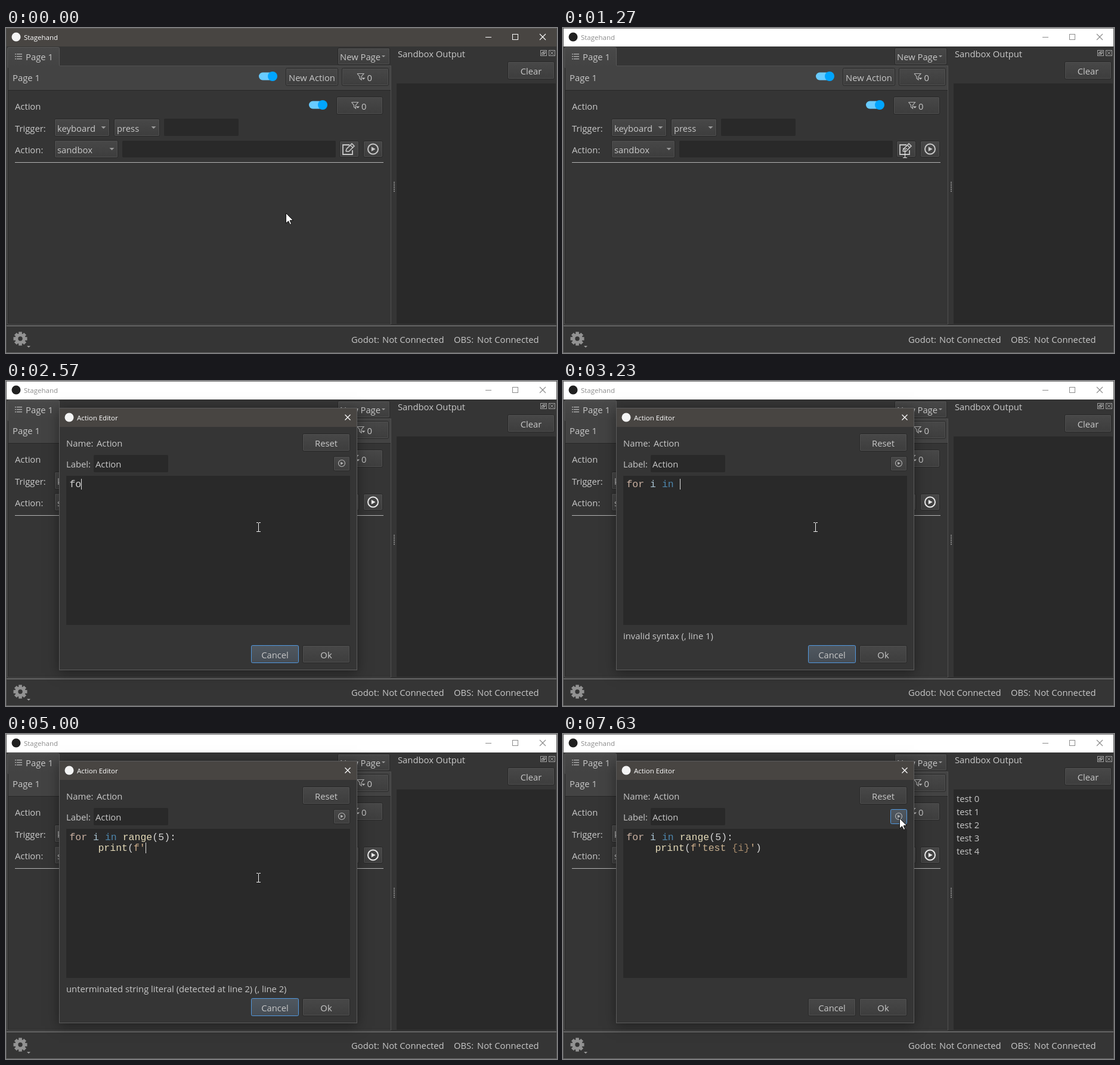
Recreate the animation shown at these times as an HTML page with a canvas. Size 924 by 545 pixels, loop 9.73 s.

```html
<!DOCTYPE html>
<html lang="en">
<head>
<meta charset="utf-8">
<title>Action editor</title>
<style>
html, body { margin: 0; width: 100%; height: 100%; overflow: hidden; background: #353535; }
canvas { display: block; }
</style>
</head>
<body>
<canvas id="stage" width="924" height="545"></canvas>
<script>
const LOOP = 9730, W = 924, H = 545;
const UI = '14.8px "Open Sans", "Noto Sans", sans-serif';
const TITLE = '11.5px "Open Sans", "Noto Sans", sans-serif';
const CODE = '16.55px "Liberation Mono", monospace';
const INK = '#c8c8c8', BASE = '#353535', FIELD = '#292929';

const screen = document.getElementById('stage').getContext('2d');
const layer = Object.assign(document.createElement('canvas'), { width: W, height: H });
const layerCtx = layer.getContext('2d');
let g = screen;

// Timing
const SOURCE = "for i in range(5):\n\tprint(f'test {i}')\n";
const KEY_TIMES = [[1, 2470], [9, 3230], [10, 3330], [11, 3430], [12, 3500], [18, 4000], [19, 4140],
  [22, 4470], [28, 5000], [29, 5100], [33, 5470], [34, 5530], [38, 5850], [39, 5950]];
const POINTER = [[0, 469, 310], [170, 490, 302], [400, 490, 302], [1130, 573, 210], [1370, 573, 210],
  [1500, 466, 239], [1600, 423, 245], [3500, 423, 245], [3700, 423, 241], [6770, 423, 241], [7430, 564, 141]];
const INACTIVE_AT = 1230, OPEN_AT = 1370, PRESS_AT = 7530, OUTPUT_AT = 7630;
const MESSAGES = [[38, ''], [37, "'(' was never closed (, line 2)"],
  [28, 'unterminated string literal (detected at line 2) (, line 2)'],
  [26, "'(' was never closed (, line 2)"], [21, ''],
  [18, "expected an indented block after 'for' statement on line 1 (, line 1)"],
  [17, "expected ':' (, line 1)"], [15, "'(' was never closed (, line 1)"],
  [10, "expected ':' (, line 1)"], [3, 'invalid syntax (, line 1)'], [0, '']];

const clamp = v => Math.max(0, Math.min(1, v));
const smooth = v => v * v * (3 - 2 * v);

function keyTime(n) {
  const i = KEY_TIMES.findIndex(k => k[0] >= n);
  const [n1, t1] = KEY_TIMES[i];
  if (n1 === n) return t1;
  const [n0, t0] = KEY_TIMES[i - 1];
  return t0 + (t1 - t0) * (n - n0) / (n1 - n0);
}

function typedCount(t) {
  let n = 0;
  while (n < SOURCE.length && keyTime(n + 1) <= t + 0.5) n++;
  return n;
}

function pointerAt(t) {
  const i = POINTER.findIndex(p => p[0] > t);
  if (i < 0) return POINTER[POINTER.length - 1].slice(1);
  const [t0, x0, y0] = POINTER[i - 1], [t1, x1, y1] = POINTER[i];
  const k = smooth((t - t0) / (t1 - t0));
  return [Math.round(x0 + (x1 - x0) * k), Math.round(y0 + (y1 - y0) * k)];
}

// Drawing helpers
function rect(x, y, w, h, fill) {
  g.fillStyle = fill;
  g.fillRect(x, y, w, h);
}

function round(x, y, w, h, r, fill, stroke) {
  g.beginPath();
  g.roundRect(x, y, w, h, r);
  if (fill) { g.fillStyle = fill; g.fill(); }
  if (stroke) { g.strokeStyle = stroke; g.lineWidth = 1; g.stroke(); }
}

function disc(x, y, r, fill) {
  g.beginPath();
  g.arc(x, y, r, 0, 7);
  g.fillStyle = fill;
  g.fill();
}

function ring(x, y, r, width, color) {
  g.beginPath();
  g.arc(x, y, r, 0, 7);
  g.lineWidth = width;
  g.strokeStyle = color;
  g.stroke();
}

function line(points, color, width = 1, fill) {
  g.beginPath();
  points.forEach(([x, y]) => g.lineTo(x, y));
  if (fill) { g.closePath(); g.fillStyle = fill; g.fill(); }
  if (color) { g.strokeStyle = color; g.lineWidth = width; g.stroke(); }
}

function text(str, x, midY, color = INK, font = UI, align = 'left') {
  g.font = font;
  g.fillStyle = color;
  g.textAlign = align;
  g.fillText(str, x, midY + (font === TITLE ? 4 : 5));
}

function shade(y, h, top, bottom) {
  const s = g.createLinearGradient(0, y, 0, y + h);
  s.addColorStop(0, top);
  s.addColorStop(1, bottom);
  return s;
}

function button(x, y, w, h, label, focused, labelX = x + w / 2) {
  const fill = focused ? shade(y, h, '#505860', '#454c54') : shade(y, h, '#484848', '#3d3d3d');
  round(x + 0.5, y + 0.5, w - 1, h - 1, 2, fill, focused ? '#5299e0' : '#272727');
  if (!focused) round(x + 1.5, y + 1.5, w - 3, h - 3, 1, null, '#505050');
  if (label) text(label, labelX, Math.floor(y + h / 2) + 2, INK, UI, 'center');
}

function down(x, y, r, color = '#9a9a9a') {
  line([[x - r, y], [x + r, y], [x, y + r]], null, 1, color);
}

function combo(x, y, w, label) {
  button(x, y, w, 30);
  text(label, x + 5, y + 17);
  down(x + w - 10.5, y + 13, 4);
}

function toggle(x, y) {
  round(x, y - 6.5, 24, 13, 6.5, '#68cbff');
  disc(x + 23, y, 8, '#00a5ff');
}

function filterButton(x, y, w) {
  button(x, y, w, 30);
  const cx = x + w / 2 - 7, cy = y + 15;
  line([[cx - 6.5, cy - 5.5], [cx + 4.5, cy - 5.5], [cx + 0.5, cy - 0.5], [cx + 0.5, cy + 5],
    [cx - 2.5, cy + 2.5], [cx - 2.5, cy - 0.5], [cx - 6.5, cy - 5.5]], '#b4b4b4', 1.2);
  down(cx + 4, cy + 1.5, 3, INK);
  text('0', x + w / 2 + 3, cy + 2);
}

function playIcon(x, y, r, width, color) {
  ring(x, y, r, width, color);
  const s = r * 0.45;
  line([[x - s * 0.7, y - s], [x + s * 1.1, y], [x - s * 0.7, y + s]], null, 1, color);
}

function cross(x, y, r, color, width = 1) {
  line([[x - r, y - r], [x + r, y + r]], color, width);
  line([[x - r, y + r], [x + r, y - r]], color, width);
}

function editIcon(x, y) {
  line([[x + 2, y - 7], [x - 9, y - 7], [x - 9, y + 9], [x + 7, y + 9], [x + 7, y + 2]], INK, 1.8);
  line([[x - 4, y + 4], [x - 3, y], [x + 6, y - 9], [x + 10, y - 5], [x + 1, y + 4], [x - 4, y + 4]], INK, 1.6);
  line([[x + 3.5, y - 6.5], [x + 7.5, y - 2.5]], INK, 1.4);
}

function gear(x, y) {
  const color = '#929292';
  g.save();
  g.translate(x, y);
  for (let i = 0; i < 8; i++) {
    rect(-2.8, -11.5, 5.6, 6, color);
    g.rotate(Math.PI / 4);
  }
  g.restore();
  ring(x, y, 6.2, 5, color);
}

// Parts of the picture
function titleBar(active) {
  rect(0, 0, W, 31, active ? '#484542' : '#ffffff');
  rect(0, 0, W, 1, active ? '#5a5856' : '#707070');
  const ink = active ? '#ffffff' : '#8c8c8c';
  disc(17, 15, 7.5, active ? '#f4f4f4' : '#202020');
  text('Stagehand', 30, 16, ink, TITLE);
  rect(804, 15, 10, 1, ink);
  g.strokeStyle = ink;
  g.lineWidth = 1;
  g.strokeRect(849.5, 10.5, 9, 9);
  cross(900, 15, 5, ink, 1.1);
}

function mainWindow(t) {
  rect(0, 0, W, H, BASE);
  titleBar(t < INACTIVE_AT);

  // Page tab and its header
  rect(3, 63, 643, 434, '#272727');
  rect(4, 64, 641, 40, '#434343');
  rect(4, 105, 641, 390, BASE);
  g.strokeStyle = '#515151';
  g.lineWidth = 1;
  g.strokeRect(2.5, 63.5, 643, 433);
  round(2.5, 32.5, 87, 33, [2, 2, 0, 0], shade(32, 32, '#494949', '#434343'), '#595959');
  rect(3, 63, 87, 4, '#434343');
  for (let i = 0; i < 3; i++) {
    rect(15, 43 + i * 4, 2, 1.5, '#a8a8a8');
    rect(18, 43 + i * 4, 9, 1.5, '#a8a8a8');
  }
  text('Page 1', 33, 49);
  button(556, 33, 88, 29, 'New Page', false, 594);
  down(633, 46, 3);
  text('Page 1', 11, 84);
  toggle(424, 81);
  button(469, 67, 88, 30, 'New Action');
  filterButton(563, 67, 79);

  // Action row
  text('Action', 15, 132);
  toggle(508, 129);
  filterButton(554, 115, 78);
  text('Trigger:', 15, 169);
  combo(81, 152, 93, 'keyboard');
  combo(181, 152, 77, 'press');
  round(265, 152, 125, 29, 2, FIELD);
  text('Action:', 15, 205);
  combo(81, 188, 107, 'sandbox');
  round(195, 189, 358, 28, 2, FIELD);
  button(559, 189, 33, 28);
  editIcon(574, 203);
  button(599, 189, 33, 28);
  playIcon(615.5, 203, 8.5, 2, t < OPEN_AT ? INK : '#ececec');
  rect(15, 225, 618, 1, '#b4b4b4');

  // Output dock
  for (let y = 258; y < 276; y += 3) rect(650, y, 2, 1.5, '#969696');
  text('Sandbox Output', 657, 44);
  g.strokeStyle = '#a0a0a0';
  g.lineWidth = 1;
  g.strokeRect(896.5, 37.5, 10, 9);
  g.strokeRect(898.5, 41.5, 4, 3);
  g.strokeRect(900.5, 39.5, 4, 3);
  g.strokeRect(910.5, 37.5, 10, 9);
  cross(915.5, 42, 3, '#b0b0b0');
  button(841, 56, 79, 30, 'Clear');
  rect(655, 93, 267, 403, FIELD);
  if (t >= OUTPUT_AT) for (let i = 0; i < 5; i++) text('test ' + i, 660, 109 + i * 22);

  // Status bar
  rect(0, 499, W, 1, '#8c8c8c');
  gear(24, 521);
  down(38, 533, 3);
  text('Godot:', 579, 523);
  text('Not Connected', 631, 523);
  text('OBS:', 751, 523);
  text('Not Connected', 790, 523);
  const edge = t < INACTIVE_AT ? '#4c4c4c' : '#565656';
  rect(0, 0, 1, H, edge);
  rect(W - 1, 0, 1, H, edge);
  rect(0, H - 1, W, 1, '#666666');
}

const tokenColor = (token, quoted) =>
  token === 'for' ? '#c9b0a0' :
  token === 'in' ? '#4d86ad' :
  /^(range|print)$/.test(token) ? '#e4dab8' :
  /^[{}]$/.test(token) || (quoted && token === 'i') ? '#a98c6c' :
  token === 'i' ? '#a9c3d2' :
  token === "'" || token === 'f' ? '#cfae8a' :
  quoted ? '#c9b190' : '#d4d4d4';

function codeText(t, n) {
  g.font = CODE;
  g.textAlign = 'left';
  const pitch = g.measureText('m').width;
  const rows = SOURCE.slice(0, n).split('\n');
  let x;
  rows.forEach((row, r) => {
    x = 106.4;
    let quoted = false;
    for (const token of row.match(/\t|\w+|\s|[^\w\s]/g) || []) {
      if (token === '\t') { x += 48; continue; }
      g.fillStyle = tokenColor(token, quoted);
      g.fillText(token, x, 178 + r * 18);
      if (token === "'") quoted = !quoted;
      x += pitch * token.length;
    }
  });
  const hidden = (t >= 1800 && t < 2330) || (t >= 6040 && t < 6570) || t >= PRESS_AT;
  if (!hidden) rect(Math.round(x), 164 + (rows.length - 1) * 18, 1, 18, '#e0e0e0');
}

function dialog(t) {
  const n = typedCount(t), pressed = t >= PRESS_AT;
  g.save();
  g.shadowColor = 'rgba(0, 0, 0, 0.4)';
  g.shadowBlur = 20;
  g.shadowOffsetY = 4;
  rect(89, 45, 500, 440, '#5c5c5c');
  g.restore();
  rect(90, 46, 498, 438, BASE);
  rect(90, 46, 498, 31, '#484542');
  disc(106, 61, 7.5, '#f4f4f4');
  text('Action Editor', 119, 62, '#ffffff', TITLE);
  cross(573, 61, 4.5, '#ffffff', 1.2);
  text('Name:', 101, 105);
  text('Action', 152, 105);
  button(497, 88, 80, 30, 'Reset');
  text('Label:', 101, 140);
  round(147, 124, 125, 29, 2, FIELD);
  text('Action', 150, 140);
  button(549, 126, 28, 25, '', pressed);
  playIcon(563, 138, 5.5, 1.1, '#b8b8b8');
  rect(101, 159, 476, 250, FIELD);
  codeText(t, n);
  text(MESSAGES.find(m => n >= m[0])[1], 101, 428);
  button(411, 443, 80, 30, 'Cancel', !pressed);
  button(497, 443, 80, 30, 'Ok');
}

function showDialog(t) {
  if (t < OPEN_AT) return;
  g = layerCtx;
  g.clearRect(0, 0, W, H);
  dialog(t);
  g = screen;
  const k = 1 - (1 - clamp((t - OPEN_AT) / 230)) ** 3;
  const size = 0.93 + 0.07 * k;
  g.save();
  g.globalAlpha = k;
  g.translate(339, 265);
  g.scale(size, size);
  g.drawImage(layer, -339, -265);
  g.restore();
}

function pointer(t) {
  const [x, y] = pointerAt(t);
  const overField = t < OPEN_AT ? x > 195 && x < 553 && y > 189 && y < 217 : x < 577 && y > 159;
  const beam = overField || (t >= INACTIVE_AT && t < 1500);
  if (beam) {
    rect(x, y - 7, 1, 15, '#f0f0f0');
    for (const dy of [-8, 7]) {
      rect(x - 3, y + dy, 3, 1, '#f0f0f0');
      rect(x + 1, y + dy, 3, 1, '#f0f0f0');
    }
    return;
  }
  const shape = [[0, 0], [0, 17], [4, 13.3], [6.8, 19], [9.2, 18], [6.6, 12.3], [12, 12]];
  line([...shape, [0, 0]].map(([a, b]) => [x + a + 0.5, y + b + 0.5]), '#101010', 1, '#ffffff');
}

function frame(now) {
  const t = now % LOOP;
  mainWindow(t);
  showDialog(t);
  pointer(t);
}

const start = performance.now();
function tick() {
  frame(performance.now() - start);
  requestAnimationFrame(tick);
}
tick();
</script>
</body>
</html>
```
